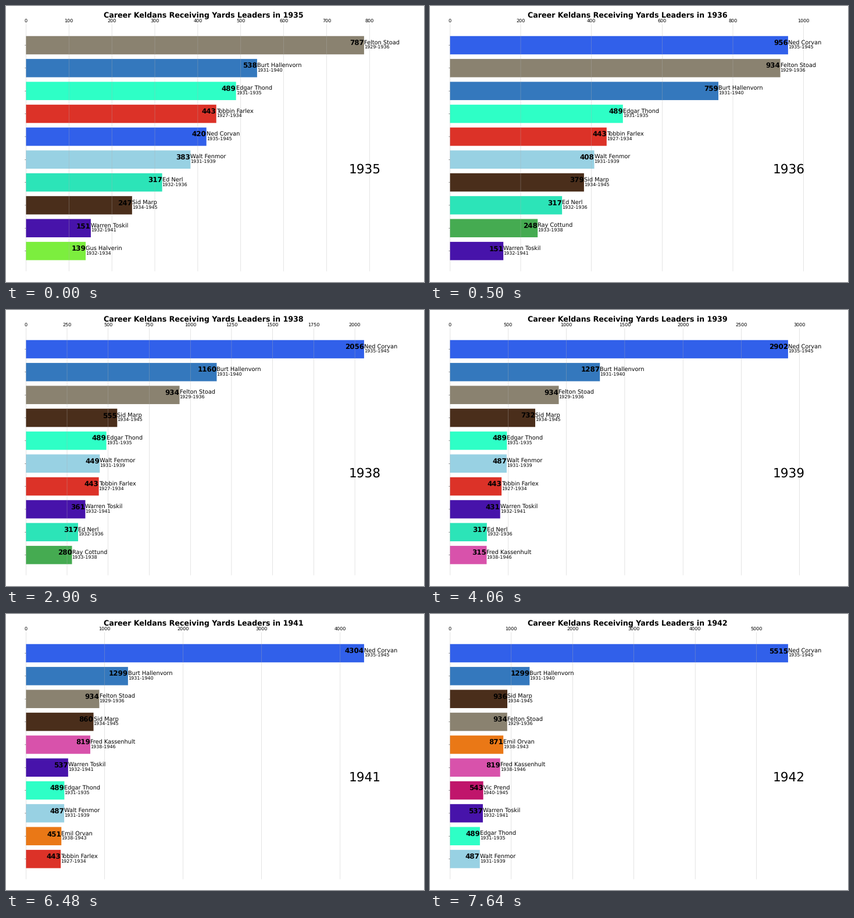
Write a matplotlib script that moves like this. It is 719 by 475 pixels and loops after 8000 ms.

```python
import matplotlib.pyplot as plt
from matplotlib.animation import FuncAnimation
from matplotlib.ticker import MaxNLocator

W, H, DPI = 719, 475, 64
LOOP_MS, STEP_MS = 8000, 20
FIRST_YEAR = 1935
CHANGES = [500, 1740, 2900, 4060, 5300, 6480, 7640]

LEFT, RIGHT, TOP, BOTTOM = 34.3, 645, 32.5, 456.5
FIRST_ROW, ROW_GAP, BAR_H = 67.5, 39.35, 31.5
ROWS = 10

# name, career, colour, then yards gained per season from FIRST_YEAR or debut
PLAYERS = [
    ("Felton Stoad", "1929-1936", "#8a8270", 787, 147),
    ("Burt Hallenvorn", "1931-1940", "#3478bd", 538, 221, 237, 164, 127, 12),
    ("Edgar Thond", "1931-1935", "#2effc6", 489),
    ("Tobbin Farlex", "1927-1934", "#dc3228", 443),
    ("Ned Corvan", "1935-1945", "#3160ea", 420, 536, 552, 548, 846, 664, 738, 1211),
    ("Walt Fenmor", "1931-1939", "#98d1e3", 383, 25, 0, 41, 38),
    ("Ed Nerl", "1932-1936", "#2ce4b8", 317),
    ("Sid Marp", "1934-1945", "#4a2e1b", 247, 132, 121, 55, 177, 60, 68, 76),
    ("Warren Toskil", "1932-1941", "#4713aa", 151, 0, 112, 98, 70, 28, 78),
    ("Gus Halverin", "1932-1934", "#7cee3e", 139),
    ("Ray Cottund", "1933-1938", "#45ab51", 100, 148, 32),
    ("Fred Kassenhult", "1938-1946", "#d852ab", 168, 147, 288, 216),
    ("Emil Orvan", "1938-1943", "#ea7816", 40, 160, 127, 124, 420),
    ("Vic Prend", "1940-1945", "#c0156b", 93, 311, 139),
]

plt.rcParams.update({"font.family": "DejaVu Sans", "text.hinting": "none"})
fig = plt.figure(figsize=(W / DPI, H / DPI), dpi=DPI, facecolor="white")


def points(px):
    return px * 72 / DPI


def total(player, year):
    """Career yards up to a year; they stay put once the gains run out."""
    _, career, _, *gains = player
    debut = max(FIRST_YEAR, int(career[:4]))
    return sum(gains[:max(0, year - debut + 1)])


def label(ax, x, y, text, px, **style):
    """Text with its baseline at pixel y."""
    ax.text(x, y, text, fontsize=points(px), va="baseline", zorder=3, **style)


def draw_grid(ax, limit, to_px):
    ticks = MaxNLocator(9, steps=[1, 2, 2.5, 5, 10]).tick_values(0, limit)
    ticks = [t for t in ticks if 0 <= t <= limit]
    ax.vlines([to_px(t) for t in ticks], TOP - 1, BOTTOM, color="#b0b0b0",
              lw=points(0.45), alpha=0.75, zorder=2, snap=False)
    for t in ticks:
        label(ax, to_px(t), 29.3, f"{t:.0f}", 8.05, ha="center")


def draw_bar(ax, row, player, value, end):
    name, career, colour, *_ = player
    y = FIRST_ROW + row * ROW_GAP
    ax.add_patch(plt.Rectangle((LEFT, y - BAR_H / 2), end - LEFT, BAR_H,
                               color=colour, lw=0, zorder=1, snap=False))
    ax.hlines(y, LEFT - 2, LEFT, color="black", lw=points(0.45), zorder=2,
              snap=False)
    label(ax, end, y + 0.4, value, 11.85, ha="right", weight="bold")
    label(ax, end, y - 1.9, name, 9.75, ha="left")
    label(ax, end, y + 6.8, career, 8.05, ha="left")


def draw_season(year):
    """One axes in pixel units holding the whole chart of a year."""
    ax = fig.add_axes([0, 0, 1, 1])
    ax.set(xlim=(0, W), ylim=(H, 0))
    ax.axis("off")

    ranked = sorted(PLAYERS, key=lambda p: total(p, year), reverse=True)
    limit = total(ranked[0], year) * 1.05

    def to_px(value):
        return LEFT + (RIGHT - LEFT) * value / limit

    for row, player in enumerate(ranked[:ROWS]):
        value = total(player, year)
        draw_bar(ax, row, player, value, to_px(value))

    draw_grid(ax, limit, to_px)
    label(ax, (LEFT + RIGHT) / 2, 20.2,
          f"Career Keldans Receiving Yards Leaders in {year}", 12.6,
          ha="center", weight="bold")
    label(ax, RIGHT, 287.2, year, 21.6, ha="right")
    return ax


seasons = [draw_season(FIRST_YEAR + s) for s in range(len(CHANGES) + 1)]


def update(frame):
    current = sum(frame * STEP_MS >= t for t in CHANGES)
    for s, ax in enumerate(seasons):
        ax.set_visible(s == current)
    return seasons


anim = FuncAnimation(fig, update, frames=LOOP_MS // STEP_MS, interval=STEP_MS,
                     init_func=lambda: update(0), repeat=True,
                     cache_frame_data=False)
plt.show()
```
